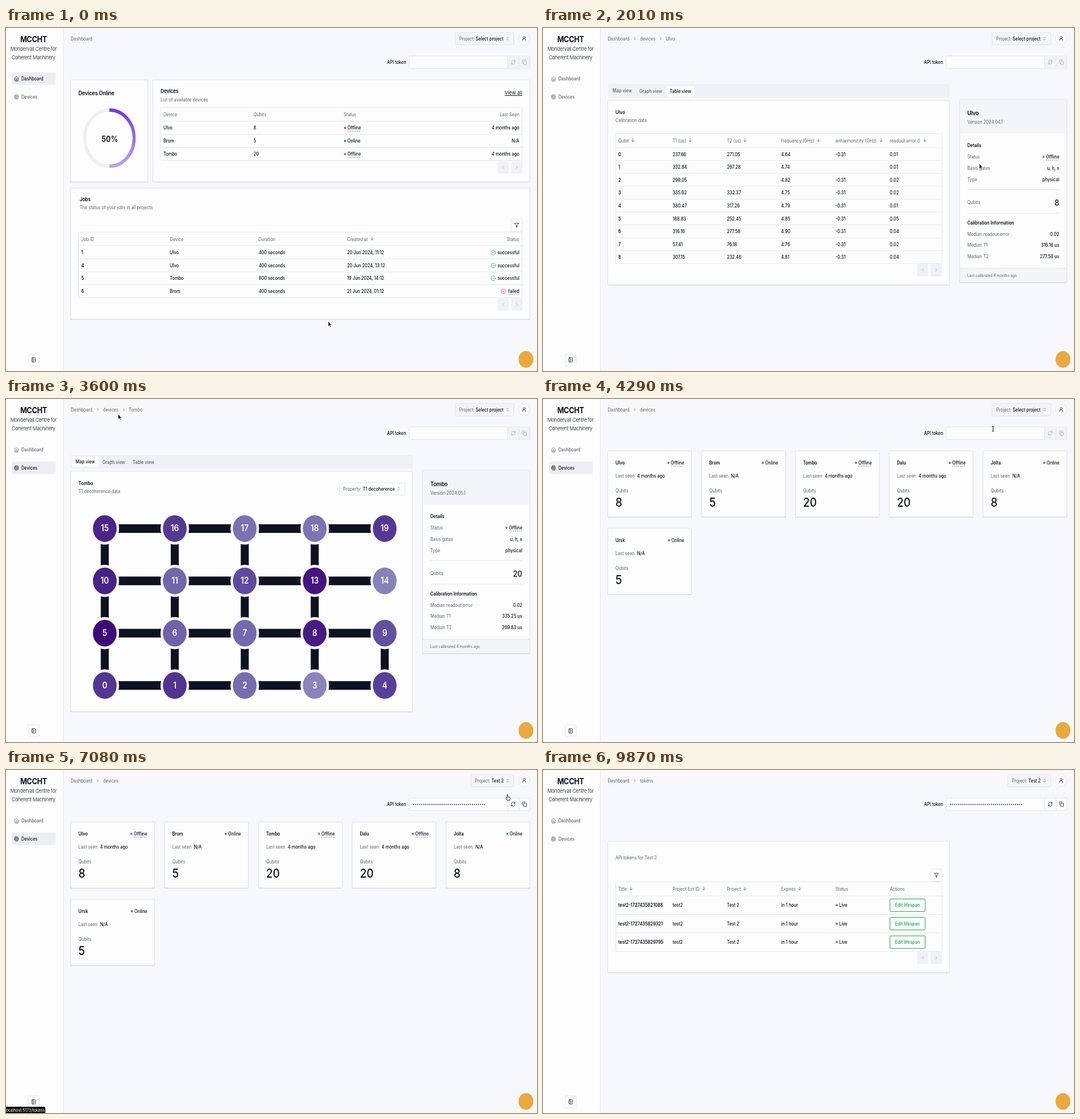
Recreate the animation shown at these times as an HTML page. Size 931 by 602 pixels, loop 9.9 s.

```html
<!DOCTYPE html>
<html lang="en">
<head>
<meta charset="utf-8">
<title>Device dashboard</title>
<style>
html, body { margin: 0; width: 100%; height: 100%; overflow: hidden; background: #f6f8fb; }
svg { display: block; width: 931px; height: 602px; font-family: Inter, "Liberation Sans", sans-serif; }
</style>
</head>
<body>
<svg id="stage" viewBox="0 0 931 602" xmlns="http://www.w3.org/2000/svg"></svg>
<script>
const LOOP = 9900, SX = 0.88;
const INK = '#0b1120', GREY = '#596475', WHITE = '#fdfdfe', LINE = '#e2e5ee', MUTED = '#f1f3f7';
const RED = '#ef4444', GREEN = '#16a34a';

const icons = {
  home: '<path d="M3 9l9-7 9 7v11a2 2 0 0 1-2 2H5a2 2 0 0 1-2-2zM9 22V12h6v10"/>',
  cpu: '<rect x="4" y="4" width="16" height="16" rx="2"/><rect x="9" y="9" width="6" height="6"/><path d="M15 2v2M15 20v2M2 15h2M2 9h2M20 15h2M20 9h2M9 2v2M9 20v2"/>',
  refresh: '<path d="M3 12a9 9 0 0 1 9-9 9.75 9.75 0 0 1 6.74 2.74L21 8M21 3v5h-5M21 12a9 9 0 0 1-9 9 9.75 9.75 0 0 1-6.74-2.74L3 16M8 16H3v5"/>',
  copy: '<rect x="8" y="8" width="14" height="14" rx="2"/><path d="M4 16c-1.1 0-2-.9-2-2V4c0-1.1.9-2 2-2h10c1.1 0 2 .9 2 2"/>',
  filter: '<path d="M22 3H2l8 9.46V19l4 2v-8.54z"/>',
  right: '<path d="M9 18l6-6-6-6"/>',
  left: '<path d="M15 18l-6-6 6-6"/>',
  updown: '<path d="M7 15l5 5 5-5M7 9l5-5 5 5"/>',
  down: '<path d="M12 5v14M19 12l-7 7-7-7"/>',
  ok: '<circle cx="12" cy="12" r="10"/><path d="M9 12l2 2 4-4"/>',
  bad: '<circle cx="12" cy="12" r="10"/><path d="M15 9l-6 6M9 9l6 6"/>',
  user: '<circle cx="12" cy="8" r="5"/><path d="M20 21a8 8 0 0 0-16 0"/>',
  panel: '<rect x="3" y="3" width="18" height="18" rx="2"/><path d="M9 3v18M16 15l-3-3 3-3"/>'
};

// y is the middle of the capital letters
function text(x, y, s, { z = 8.4, w = 450, c = INK, a = 'start', ls = 0, extra = '' } = {}) {
  return `<text transform="translate(${x} ${y + z * 0.36}) scale(${SX} 1)" font-size="${z}" font-weight="${w}" fill="${c}" text-anchor="${a}" letter-spacing="${ls * z}" ${extra}>${s}</text>`;
}
const grey = (x, y, s, o = {}) => text(x, y, s, { w: 400, c: GREY, ...o });
const bold = (x, y, s, o = {}) => text(x, y, s, { w: 600, ...o });
const end = (x, y, s, o = {}) => text(x, y, s, { a: 'end', ...o });
const heading = (x, y, s, z = 9.6) => bold(x, y, s, { z, ls: -0.025 });

function rect(x, y, x2, y2, fill, stroke = 'none', r = 2) {
  return `<rect x="${x}" y="${y}" width="${x2 - x}" height="${y2 - y}" rx="${r}" fill="${fill}" stroke="${stroke}"/>`;
}
function icon(name, x, y, h = 9.6, c = INK, sw = 2) {
  const k = h / 24;
  return `<g transform="translate(${x} ${y}) scale(${k * SX} ${k}) translate(-12 -12)" fill="none" stroke="${c}" stroke-width="${sw}" stroke-linecap="round" stroke-linejoin="round">${icons[name]}</g>`;
}
const rule = (x, x2, y, c = LINE) => `<path d="M${x} ${y}H${x2}" stroke="${c}" stroke-width=".9"/>`;
const dashes = (x, x2, y, c) => `<path d="M${x} ${y}H${x2}" stroke="${c}" stroke-width=".9" stroke-dasharray="2 1.4"/>`;
const card = (x, y, x2, y2) =>
  rect(x - 0.3, y + 1, x2 + 0.3, y2 + 1.3, '#d3d9ea') + rect(x, y, x2, y2, WHITE, '#dde2ee');

function status(x, y, online, under = '#64748b') {
  return `<ellipse cx="${x}" cy="${y}" rx="1.8" ry="2" fill="${online ? GREEN : RED}"/>` +
    text(x + 4.3, y, online ? 'Online' : 'Offline') +
    (online ? '' : dashes(x + 4.3, x + 27.5, y + 5.8, under));
}
const pager = (x, y) => [['left', x], ['right', x + 23.5]].map(([n, px]) =>
  rect(px, y, px + 19.8, y + 21.5, '#f0f1f6') + icon(n, px + 9.9, y + 10.5, 9.6, '#a3a9b6')).join('');
const filterButton = (x, y) => rect(x, y, x + 19.8, y + 21.5, WHITE, LINE) + icon('filter', x + 9.9, y + 10.8, 9.8);
const table = (x, y, x2, y2, lines) =>
  rect(x, y, x2, y2, WHITE, LINE) + lines.map(l => rule(x, x2, l)).join('');
const crumbs = (...parts) => grey(113.5, 18.5, 'Dashboard') + parts.map((p, i) =>
  icon('right', i ? 206.5 : 161, 18.5, 8.4, GREY) + grey(i ? 215.3 : 170, 18.5, p)).join('');

const devices = [
  ['Ulvo', 8, false], ['Brom', 5, true], ['Tombo', 20, false],
  ['Dalu', 20, false], ['Jolta', 8, true], ['Ursk', 5, true]
];
const seen = d => d[2] ? 'N/A' : '4 months ago';

function frame() {
  return rect(0, 0, 100, 602, WHITE, 'none', 0) + '<path d="M100.5 0V602" stroke="#e6e9f1"/>' +
    text(48.3, 20, 'MCCHT', { z: 14.4, w: 700, a: 'middle', ls: -0.025 }) +
    ['Mondervall Centre for', 'Coherent Machinery'].map((s, i) =>
      text(48.3, 37 + 14.6 * i, s, { z: 9.6, w: 300, a: 'middle', ls: -0.025 })).join('') +
    rect(39, 572, 58, 593, WHITE, LINE) + icon('panel', 48.5, 582.5, 9.8) +
    `<ellipse cx="908.5" cy="18.5" rx="9.6" ry="10.8" fill="${WHITE}" stroke="${LINE}"/>` +
    icon('user', 908.5, 18.3, 9.6) +
    text(668, 60, 'API token', { w: 500 }) + rect(707, 49, 918.5, 71, WHITE, LINE) +
    '<ellipse cx="911.7" cy="581.7" rx="13" ry="14.7" fill="#e9a93f"/>';
}

function nav(active) {
  return [['Dashboard', 'home', 89], ['Devices', 'cpu', 121]].map(([s, n, y]) => {
    const on = s === active, c = on ? INK : GREY;
    return (on ? rect(10, y - 10.8, 87, y + 10.8, '#eceef4') : '') + icon(n, 18.4, y, 9.6, c) +
      text(27, y, s, { c });
  }).join('');
}

function project(x, name) {
  return rect(x, 8, 890.5, 29.5, '#f3f5f9', LINE) +
    grey(x + 7.3, 18.5, `Project: <tspan font-weight="500" fill="${INK}">${name}</tspan>`) +
    icon('updown', 879.3, 18.5, 8, GREY);
}
function tokenButtons(on) {
  const c = on ? INK : '#a3a9b6';
  return (on ? '' : rect(879.5, 49.5, 918, 70.5, MUTED)) +
    `<path d="M879.5 49V71M899.5 49V71" stroke="${LINE}"/>` +
    icon('refresh', 889.3, 60, 9.6, c) + icon('copy', 909, 60, 9.8, c);
}

function dashboard() {
  const ring = 'fill="none" stroke-width="6"';
  const jobs = [[1, 'Ulvo', 400, '20 Jun 2024, 11:12'], [4, 'Ulvo', 400, '20 Jun 2024, 13:12'],
    [5, 'Tombo', 800, '19 Jun 2024, 14:12'], [6, 'Brom', 400, '21 Jun 2024, 01:12']];
  return nav('Dashboard') + crumbs() +
    card(113.5, 91, 248.5, 270) + heading(127, 114.3, 'Devices Online', 10.4) +
    `<g transform="translate(181.3 193.3) scale(${SX} 1)"><circle r="49.3" ${ring} stroke="#eeeff1"/>
     <path d="M0-49.3A49.3 49.3 0 0 1 0 49.3" ${ring} stroke="url(#violet)"/></g>` +
    bold(182, 194.5, '50%', { z: 14.4, a: 'middle' }) +
    card(257.5, 91, 918.5, 270) + heading(271, 111, 'Devices') +
    grey(271, 125.5, 'List of available devices') +
    end(905, 113.5, 'View all', { z: 9.6, w: 400, extra: 'text-decoration="underline"' }) +
    table(271, 139, 905, 232.5, [163.5, 186.5, 209.5]) +
    grey(276, 152, 'Device') + grey(434, 152, 'Qubits') + grey(592, 152, 'Status') +
    grey(900, 152, 'Last Seen', { a: 'end' }) +
    devices.slice(0, 3).map((d, i) => {
      const y = 175.2 + 23 * i;
      return text(276, y, d[0], { w: 500 }) + text(434, y, d[1]) + status(594.5, y, d[2]) + end(900, y, seen(d));
    }).join('') + pager(862, 234) +
    card(113.5, 280.5, 918.5, 511) + heading(129, 300.3, 'Jobs') +
    grey(129, 315, 'The status of your jobs in all projects') + filterButton(885.3, 335.5) +
    table(127.5, 358.5, 905, 473.5, [382, 405.3, 428, 450.7]) +
    ['Job ID', 'Device', 'Duration', 'Created at'].map((s, i) => grey(132 + 155.3 * i, 370.5, s)).join('') +
    icon('down', 642, 369.5, 9.6, GREY) + grey(900, 370.5, 'Status', { a: 'end' }) +
    jobs.map(([id, dev, secs, at], i) => {
      const y = 394 + 22.7 * i, failed = id === 6;
      return bold(132, y, id) + text(287, y, dev) + text(443, y, secs + ' seconds') + text(598, y, at) +
        icon(failed ? 'bad' : 'ok', failed ? 872.3 : 854.3, y, 9.8, failed ? RED : GREEN) +
        end(900, y, failed ? 'failed' : 'successful') + (failed ? dashes(881, 900, y + 5.8, '#64748b') : '');
    }).join('') + pager(862, 474.5);
}

function tabs(active) {
  return rect(113.5, 98, 713, 122, '#eef1f5') +
    [['Map view', 122, 115.5, 162.5], ['Graph view', 169, 0, 0], ['Table view', 222, 216, 266]].map(([s, x, l, r]) => {
      const on = s === active, y = x === 122 ? 110.3 : 111.2;
      return (on ? rect(l, y - 9, r, y + 9, WHITE) : '') + text(x, y, s, { w: 500, c: on ? INK : GREY });
    }).join('');
}

function details(name, version, qubits, t1, t2) {
  const row = (y, label, value) => grey(744, y, label) + (value ? end(905, y, value) : '');
  return card(730.5, 125, 918.5, 446.5) +
    rect(731, 125.5, 918, 185, '#f3f5f9') + rect(731, 421.5, 918, 446, '#f3f5f9') + rule(731, 918, 421.5) +
    heading(744, 148.7, name, 10.8) + grey(744, 164.5, 'Version ' + version) +
    bold(744, 206, 'Details') + row(226, 'Status') + status(877.5, 226, false) +
    row(245.7, 'Basis gates', 'u, h, x') + row(265.5, 'Type', 'physical') + rule(744, 905, 283.5) +
    row(306, 'Qubits') + end(905, 306.5, qubits, { z: 14.4 }) + rule(744, 905, 325) +
    bold(744, 342, 'Calibration Information') + row(361.7, 'Median readout error', '0.02') +
    row(381.2, 'Median T1', t1 + ' us') + row(400.7, 'Median T2', t2 + ' us') +
    grey(744, 434.5, 'Last calibrated 4 months ago', { z: 7.2 });
}

const colX = i => +(132 + 95.2 * i).toFixed(1);

function calibration() {
  const heads = [['Qubit', 157.5], ['T1 (us)', 258], ['T2 (us)', 354], ['frequency (GHz)', 483],
    ['anharmonicity (GHz)', 593], ['readout error ()', 669.5]];
  const rows = ['237.66 271.05 4.64 -0.31 0.01', '332.84 267.28 4.74 _ 0.01', '299.05 _ 4.82 -0.31 0.02',
    '335.62 332.37 4.75 -0.31 0.02', '380.47 317.26 4.79 -0.31 0.01', '188.83 252.45 4.85 -0.31 0.05',
    '316.16 277.58 4.90 -0.31 0.04', '57.41 76.18 4.76 -0.31 0.02', '307.15 232.46 4.81 -0.31 0.04'];
  return nav() + crumbs('devices', 'Ulvo') + tabs('Table view') +
    card(113.5, 127, 712.5, 450.5) + bold(127, 147.5, 'Ulvo', { z: 8.8 }) + grey(127, 162, 'Calibration data') +
    table(127.5, 185.5, 699.5, 413.5, rows.map((_, i) => 210 + 22.6 * i)) +
    heads.map(([s, x], i) => grey(colX(i), 198, s) + icon('down', x, 197, 9.6, GREY)).join('') +
    rows.map((r, i) => {
      const y = 221.5 + 22.6 * i;
      return bold(132, y, i) + r.split(' ').map((v, j) => v === '_' ? '' : text(colX(j + 1), y, v)).join('');
    }).join('') + pager(656, 414.5) +
    details('Ulvo', '2024.04.1', 8, '316.16', '277.58');
}

function qubitMap() {
  const shades = ('533692 523390 766db1 8885bc 57409a 3d0a78 6f62a9 7468ae 471b84 6350a0 ' +
    '4a2187 7167ab 5f4b9d 44147f 8683bb 4c2389 553a94 7a72b3 7d74b4 543893').split(' ');
  let links = '', nodes = '';
  shades.forEach((c, i) => {
    const col = i % 5, x = 173.2 + 122.7 * col, y = 502.8 - 91.8 * Math.floor(i / 5);
    if (col < 4) links += rect(x, y - 7.6, x + 122.7, y + 7.6, '#0c1220', 'none', 0);
    if (i < 15 && (col < 4 || i === 4)) links += rect(x - 7, y - 91.8, x + 7, y, '#0c1220', 'none', 0);
    nodes += `<ellipse cx="${x}" cy="${y}" rx="25" ry="28.2" fill="${WHITE}"/>
      <ellipse cx="${x}" cy="${y}" rx="20.8" ry="23.5" fill="#${c}"/>` +
      bold(x, y - 0.5, i, { z: 15.4, c: '#fff', a: 'middle' });
  });
  return nav('Devices') + crumbs('devices', 'Tombo') + tabs('Map view') +
    card(113.5, 127, 712.5, 548.5) + bold(127, 147.5, 'Tombo', { z: 8.8 }) + grey(127, 162, 'T1 decoherence data') +
    rect(584.5, 147, 699.5, 168.5, WHITE, LINE) +
    grey(591, 157.7, `Property: <tspan font-weight="500" fill="${INK}">T1 decoherence</tspan>`) +
    icon('updown', 688.3, 157.7, 8, GREY) + links + nodes +
    details('Tombo', '2024.05.1', 20, '335.25', '269.83');
}

function deviceList() {
  return nav('Devices') + crumbs('devices') + devices.map((d, i) => {
    const x = 113.5 + 164.5 * (i % 5), y = i < 5 ? 91 : 227;
    return card(x, y, x + 147, y + 116) + bold(x + 13.5, y + 21, d[0]) +
      status(x + (d[2] ? 107.3 : 106.3), y + 21, d[2], '#7c5cc4') +
      grey(x + 13.5, y + 43.5, 'Last seen') + text(x + 51.5, y + 43.5, seen(d)) +
      grey(x + 13.5, y + 70.3, 'Qubits') + text(x + 13.5, y + 90, d[1], { z: 21.6 });
  }).join('');
}

function tokens() {
  const heads = [['Title', 154], ['Project Ext ID', 282], ['Project', 354], ['Expires', 450], ['Status'], ['Actions']];
  const ids = ['1727435821088', '1727435829321', '1727435829795'];
  return nav() + crumbs('tokens') + card(113.5, 125, 712.5, 355.5) +
    grey(127, 153.5, 'API tokens for Test 2') + filterButton(679.8, 174) +
    table(127.5, 196.5, 699.5, 318.3, [221, 253.4, 285.8]) +
    heads.map(([s, x], i) => grey(colX(i), 209, s) + (x ? icon('down', x, 208, 9.6, GREY) : '')).join('') +
    ids.map((id, i) => {
      const y = 237.3 + 32.4 * i;
      return bold(132, y, 'test2-' + id) + text(colX(1), y, 'test2') + text(colX(2), y, 'Test 2') +
        text(colX(3), y, 'in 1 hour') + `<ellipse cx="515" cy="${y}" rx="1.8" ry="2" fill="${GREEN}"/>` +
        text(519.2, y, 'Live') + rect(608.3, y - 11, 670, y + 11, WHITE, GREEN) +
        text(639, y, 'Edit lifespan', { w: 500, c: GREEN, a: 'middle' });
    }).join('') + pager(656, 319);
}

const tip = (path, w) => rect(-4, 591, w, 606, '#0a0a0a') +
  text(-2, 597, 'localhost:5173/' + path, { z: 7.8, w: 400, c: '#fff' });

const pointers = {
  arrow: '<path d="M0 0V9.2L2 7.4 3.3 10.4 4.8 9.7 3.5 6.8H5.8Z" fill="#000" stroke="#fff" stroke-width=".7"/>',
  beam: '<path d="M-1.8-4.6Q0-4.6 0-3.4Q0-4.6 1.8-4.6M0-3.4V3.4M-1.8 4.6Q0 4.6 0 3.4Q0 4.6 1.8 4.6" fill="none" stroke="#111"/>',
  hand: '<path d="M-1.4-4.4Q-.6-5.4 .2-4.4V-.8L3-.2Q4.2.2 4 1.6L3.2 5.2H-1.2L-3.6 1.6Q-3.6.4-2.4.7L-1.4 1.6Z" fill="#fff" stroke="#111" stroke-width=".9" stroke-linejoin="round"/>'
};

// each layer: markup, then the time spans in which it shows
const layers = [
  [frame(), [0, LOOP]],
  [project(787.5, 'Select project') + tokenButtons(false), [0, 5000]],
  [rect(879.5, 49.5, 899, 70.5, '#e4e7f1', 'none', 0), [5400, 6120]],
  [project(815, 'Test 2') + tokenButtons(true), [5000, LOOP]],
  ['<path d="M715 60.5H839.5" stroke="#0b1120" stroke-width="1.8" stroke-linecap="round" stroke-dasharray="0 3.54"/>', [5500, LOOP]],
  [dashboard(), [0, 1000]],
  [calibration(), [1000, 2450]],
  [deviceList(), [2450, 2910], [3830, 7100]],
  [qubitMap(), [2910, 3830]],
  [tokens(), [7100, LOOP]],
  [tip('devices', 72), [2320, 2560], [3680, 3950]],
  [tip('devices/Tombo', 92), [2700, 3060]],
  [tip('tokens', 69), [6900, 7250]]
];

// time, x, y
const path = [[0, 565, 514.5], [200, 565, 514.5], [800, 300, 174], [1080, 300, 174], [1450, 241, 112],
  [1560, 241, 112], [2000, 765, 238], [2050, 765, 238], [2360, 44, 121], [2500, 44, 121], [2780, 491, 185.5],
  [3060, 491, 185.5], [3680, 183, 19], [3880, 183, 19], [4290, 789, 52.5], [4620, 850, 19], [4760, 850, 19],
  [4900, 850, 40], [5020, 850, 40], [5400, 886, 66.5], [6050, 886, 66.5], [6400, 908, 19], [6600, 908, 19],
  [6900, 880, 48], [7130, 880, 48], [7700, 749.5, 178], [8400, 749.5, 178], [9100, 945, 300], [LOOP, 945, 300]];
const hands = [[2320, 2480], [2680, 2910], [3680, 3830], [5380, 6120], [6880, 7100]];
const beams = [[4240, 4360]];

const within = (spans, t) => spans.some(([a, b]) => t >= a && t < b);
const stage = document.getElementById('stage');
stage.innerHTML = '<defs><linearGradient id="violet" gradientUnits="userSpaceOnUse" x1="0" y1="-50" x2="0" y2="50">' +
  '<stop offset="0" stop-color="#7434e4"/><stop offset="1" stop-color="#bba2f5"/></linearGradient></defs>' +
  layers.map(l => `<g>${l[0]}</g>`).join('') +
  '<g id="pointer">' + Object.values(pointers).map(p => `<g>${p}</g>`).join('') + '</g>';
const groups = [...stage.children].slice(1, 1 + layers.length);
const pointer = document.getElementById('pointer');
const show = (el, on) => el.setAttribute('display', on ? 'inline' : 'none');

function draw(t) {
  layers.forEach(([, ...spans], i) => show(groups[i], within(spans, t)));
  const i = Math.max(1, path.findIndex(p => p[0] > t));
  const [ta, xa, ya] = path[i - 1], [tb, xb, yb] = path[i];
  const u = (t - ta) / (tb - ta), e = u * u * (3 - 2 * u);
  pointer.setAttribute('transform', `translate(${xa + (xb - xa) * e} ${ya + (yb - ya) * e})`);
  const kind = within(hands, t) ? 2 : within(beams, t) ? 1 : 0;
  [...pointer.children].forEach((el, k) => show(el, k === kind));
}

const start = performance.now();
function tick() {
  draw((performance.now() - start) % LOOP);
  requestAnimationFrame(tick);
}
tick();
</script>
</body>
</html>
```
